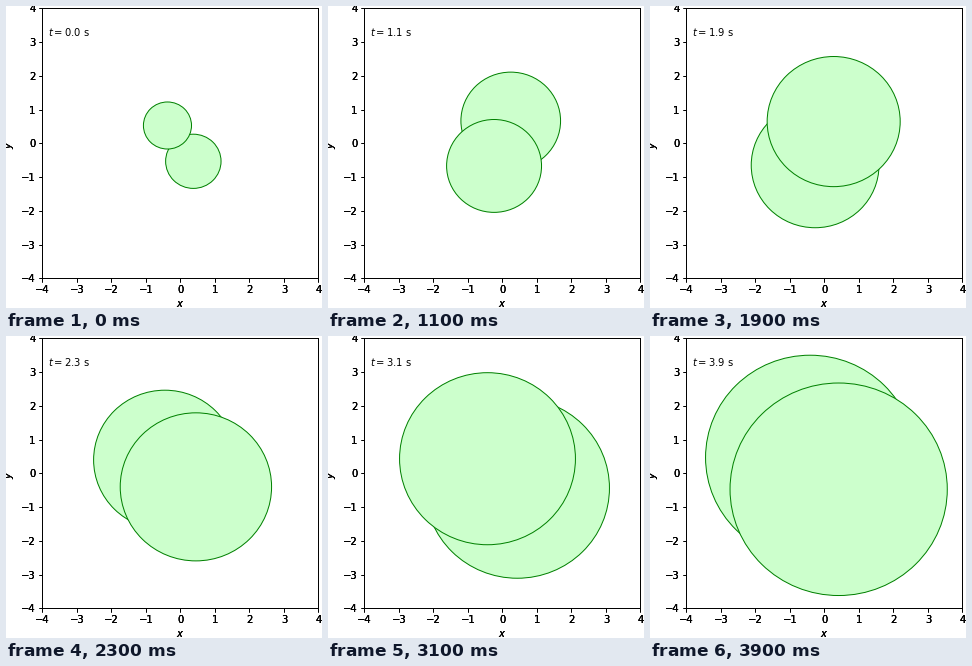
Write a matplotlib script that moves like this. It is 316x302 px and loops after 4 s.

```python
import numpy as np
import matplotlib.pyplot as plt
from matplotlib.animation import FuncAnimation
from matplotlib.patches import Circle

W, H, DPI = 316, 302, 72
FRAMES, INTERVAL = 40, 100
LAYERS = 3  # stacked copies of the axes give the heavy labels

ORBIT = 0.75
OMEGA = 4.0
TILT = np.pi / 4

plt.rcParams["font.family"] = "DejaVu Sans"
plt.rcParams["font.size"] = 10
plt.rcParams["mathtext.fontset"] = "dejavusans"

fig = plt.figure(figsize=(W / DPI, H / DPI), dpi=DPI, facecolor="white")
BOX = [36.4 / W, (H - 272.4) / H, 276 / W, 270 / H]


def add_layer(index):
    ax = fig.add_axes(BOX, label=f"layer{index}")
    ax.patch.set_visible(False)
    ax.set(xlim=(-4, 4), ylim=(-4, 4),
           xticks=range(-4, 5), yticks=range(-4, 5))
    fig.text(174 / W, 1 / H, "$x$", ha="center", va="baseline")
    fig.text(5.5 / W, (H - 139) / H, "$y$", rotation=90,
             rotation_mode="anchor", ha="center", va="baseline")
    return ax


ax = [add_layer(i) for i in range(LAYERS)][-1]
back, front = [
    ax.add_patch(Circle((0, 0), 1, facecolor="#ccffcc", edgecolor="green",
                        linewidth=1))
    for _ in range(2)
]
clock = ax.text(0.02, 0.896, "", transform=ax.transAxes)


def place(disc, t, side):
    """Tilted orbit; the radius grows steadily with a small wobble."""
    swing = side * np.sin(OMEGA * t - np.pi / 4)
    lift = side * np.sin(OMEGA * t + np.pi / 4)
    disc.center = (ORBIT * np.cos(TILT) * swing, ORBIT * lift)
    disc.set_radius(0.75 + 0.6 * t + 0.075 * swing)


def update(i):
    t = i * INTERVAL / 1000
    place(back, t, -1)
    place(front, t, 1)
    clock.set_text(f"$t = {t:.1f}$ s")
    return back, front, clock


anim = FuncAnimation(fig, update, frames=FRAMES, interval=INTERVAL,
                     init_func=lambda: update(0), repeat=True,
                     repeat_delay=0, blit=False)
plt.show()
```
